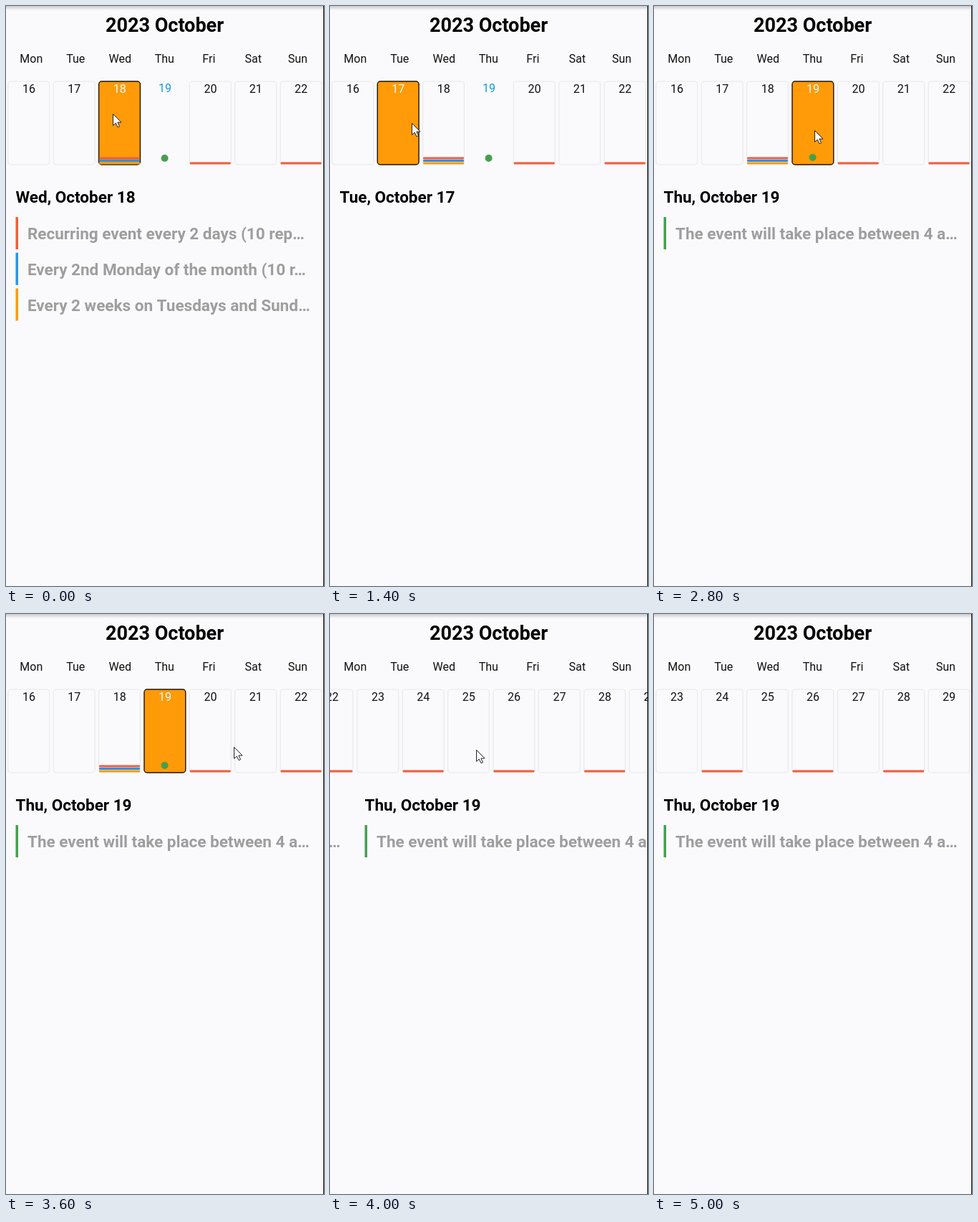
Recreate the animation shown at these times as an HTML page with a canvas. Size 444 by 808 pixels, loop 5.6 s.

```html
<!DOCTYPE html>
<html lang="en">
<head>
<meta charset="utf-8">
<title>Week calendar</title>
<style>
html, body { margin: 0; width: 100%; height: 100%; overflow: hidden; background: #fafafc; }
canvas { display: block; }
</style>
</head>
<body>
<canvas id="stage" width="444" height="808"></canvas>
<script>
const ctx = document.getElementById('stage').getContext('2d');
const W = 444, H = 808, LOOP = 5600, TICK = 200;
const RED = '#f55c38', BLUE = '#2b93ea', ORANGE = '#ff9a08', GREEN = '#45a04d';
const WEEKDAYS = ['Mon', 'Tue', 'Wed', 'Thu', 'Fri', 'Sat', 'Sun'];
const TODAY = 19;

const AGENDA = {
  17: [],
  18: [
    [RED, 'Recurring event every 2 days (10 rep…'],
    [BLUE, 'Every 2nd Monday of the month (10 r…'],
    [ORANGE, 'Every 2 weeks on Tuesdays and Sund…']
  ],
  19: [[GREEN, 'The event will take place between 4 a…']]
};

// [start time, x, y] of the pointer tip
const POINTER = [
  [0, 149, 150], [1000, 133, 157], [1200, 114, 163], [1600, 208, 172],
  [2400, 224, 173], [3000, 265, 176], [3200, 304, 178], [3400, 344, 183],
  [3600, 318, 185], [3800, 215, 188], [4000, 204, 189], [4600, 183, 184],
  [4800, 68, 124]
];

function text(str, x, y, size, color = '#000', weight = 400, align = 'left') {
  ctx.font = `${weight} ${size}px Roboto, sans-serif`;
  ctx.textAlign = align;
  ctx.fillStyle = color;
  ctx.fillText(str, x, y);
}

function box(x, y, w, h, r) {
  ctx.beginPath();
  ctx.roundRect(x, y, w, h, r);
}

function bar(x, y, w, h, color, r = 0) {
  box(x, y, w, h, r);
  ctx.fillStyle = color;
  ctx.fill();
}

function linesFor(day) {
  if (day === 18) return [ORANGE, BLUE, RED];
  return day >= 18 && day % 2 === 0 ? [RED] : [];
}

function drawDay(day, col, selected) {
  const x = 3 + col * 63.35, mid = x + 29;
  const plainToday = day === TODAY && !selected;
  if (!plainToday) {
    box(x - .1, 105, 57.8, 116, 4);
    if (selected) {
      ctx.fillStyle = ORANGE;
      ctx.fill();
    }
    ctx.strokeStyle = selected ? '#1c1408' : '#e9e9ec';
    ctx.lineWidth = selected ? 1.4 : 1.2;
    ctx.stroke();
  }
  linesFor(day).forEach((c, i) => bar(x + .3, 217.6 - i * 3.5, 57, 3, c, 1));
  if (day === TODAY) {
    ctx.beginPath();
    ctx.arc(mid - .5, plainToday ? 212 : 211, 5, 0, 7);
    ctx.fillStyle = GREEN;
    ctx.fill();
  }
  const color = selected ? '#fff' : plainToday ? '#149bd7' : '#111';
  text(day, mid, plainToday ? 119.5 : 120.5, 16, color, 400, 'center');
}

function drawWeek(first, shift, selected) {
  ctx.save();
  ctx.translate(shift, 0);
  for (let i = 0; i < 7; i++) drawDay(first + i, i, first + i === selected);
  ctx.restore();
}

function drawAgenda(day, shift) {
  ctx.save();
  ctx.translate(shift, 0);
  text(`${WEEKDAYS[(day - 16) % 7]}, October ${day}`, 13.5, 274, 22.5, '#000', 700);
  AGENDA[day].forEach(([color, title], i) => {
    const y = 294 + i * 49.7;
    bar(13.5, y, 3.5, 45, color);
    text(title, 30, y + 31.3, 22.5, '#9e9e9e', 700);
  });
  ctx.restore();
}

function drawPointer(t) {
  if (t >= 5000) return;
  const [, x, y] = POINTER.findLast(p => p[0] <= t);
  ctx.save();
  ctx.translate(x + .5, y + .5);
  const shape = new Path2D('M0 0V16L3.7 12.6L6.5 18.3L9 17.2L6.3 11.6H11.5Z');
  ctx.fillStyle = '#fff';
  ctx.fill(shape);
  ctx.strokeStyle = '#222';
  ctx.lineWidth = 1;
  ctx.stroke(shape);
  ctx.restore();
}

// Distance the incoming page still has to travel
function pageOffset(t) {
  return t < 3800 ? W : Math.round(340 * Math.exp((3800 - t) / 88));
}

function draw(t) {
  ctx.fillStyle = '#fafafc';
  ctx.fillRect(0, 0, W, H);
  const shade = ctx.createLinearGradient(0, 0, 0, 6);
  shade.addColorStop(0, '#c9c9cb');
  shade.addColorStop(1, '#fafafc');
  ctx.fillStyle = shade;
  ctx.fillRect(0, 0, W, 6);

  text('2023 October', 221.5, 36, 27, '#000', 700, 'center');
  WEEKDAYS.forEach((name, i) => text(name, 35.3 + i * 62, 78.5, 16, '#111', 400, 'center'));

  const selected = t < 1400 ? 18 : t < 2800 ? 17 : 19;
  const offset = pageOffset(t);
  for (const [first, shift] of [[16, offset - W], [23, offset]]) {
    drawWeek(first, shift, selected);
    drawAgenda(selected, shift);
  }
  drawPointer(t);
  ctx.fillStyle = '#111';
  ctx.fillRect(443, 0, 1, H);
}

const start = performance.now();
function frame() {
  const t = (performance.now() - start) % LOOP;
  draw(Math.floor(t / TICK) * TICK);
  requestAnimationFrame(frame);
}
frame();
</script>
</body>
</html>
```
